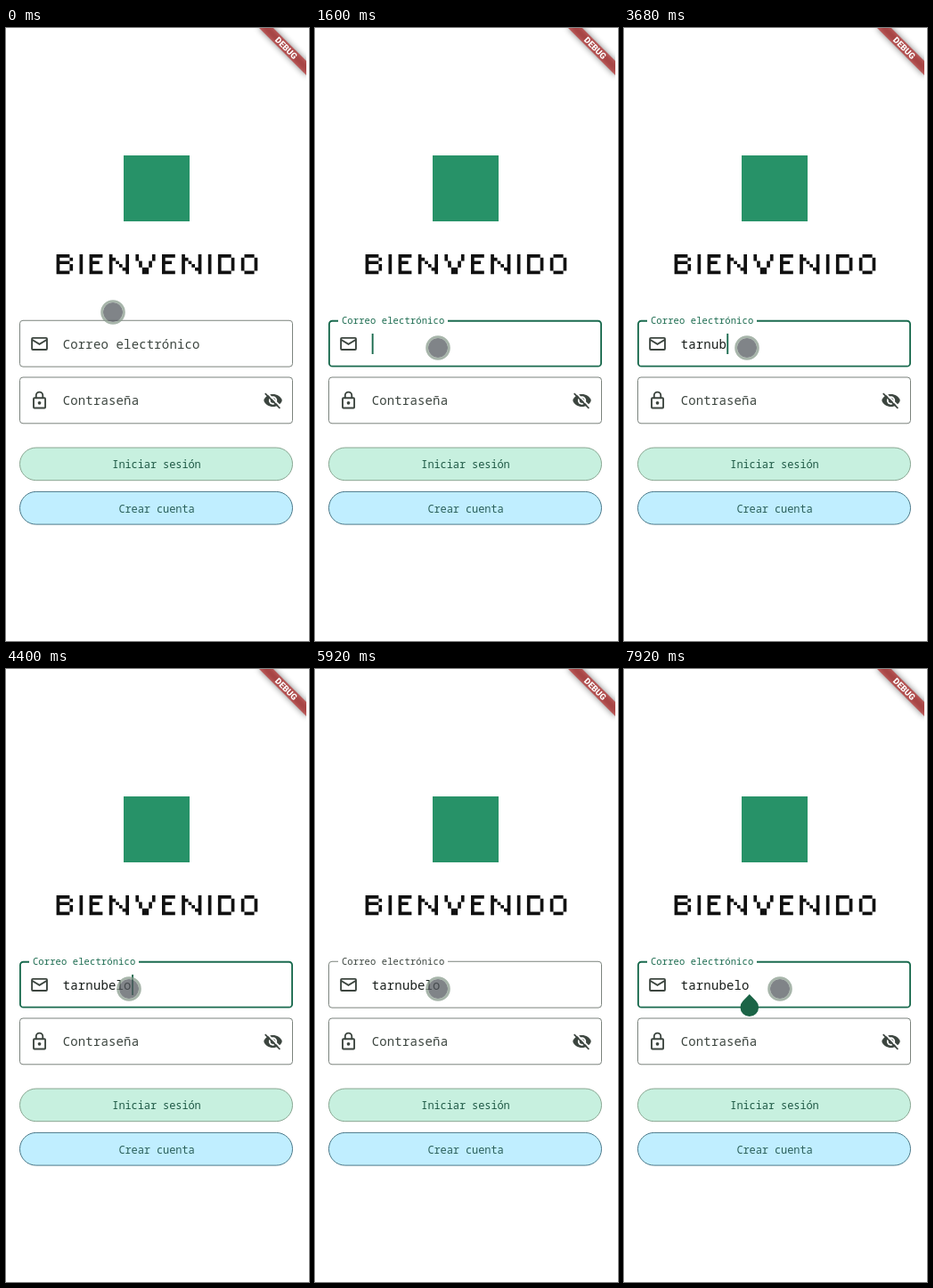
Recreate the animation shown at these times as an HTML page. Size 340x688 px, loop 8 s.

```html
<!DOCTYPE html>
<html lang="es">
<head>
<meta charset="utf-8">
<title>Bienvenido</title>
<style>
  html, body { margin: 0; width: 100%; height: 100%; overflow: hidden; background: #fff; }
  svg { display: block; width: 340px; height: 688px; }
  text { font-family: "Noto Sans Mono", monospace; fill: #3c453f; white-space: pre; }
  .body { font-size: 14px; letter-spacing: .15px; }
  .button { font-size: 12px; letter-spacing: -.1px; text-anchor: middle; }
  .banner { font: 900 9.55px Roboto, sans-serif; fill: #fff; text-anchor: middle; }
  .icon { fill: none; stroke: #3c453f; stroke-width: 2; }
  .box { fill: none; stroke: #737b75; stroke-width: .94; }
</style>
</head>
<body>
<svg viewBox="0 0 340 688">
  <defs>
    <clipPath id="screen"><rect width="337" height="688"/></clipPath>
    <filter id="soft" x="-30%" y="-150%" width="160%" height="400%"><feGaussianBlur stdDeviation="3.6"/></filter>
  </defs>

  <g clip-path="url(#screen)">
    <g transform="translate(314.5 22.5) rotate(45)">
      <rect x="-37.5" y="-5.6" width="75" height="11.2" opacity=".5" filter="url(#soft)"/>
      <rect x="-37.5" y="-5.6" width="75" height="11.2" fill="#b71c1c" opacity=".63"/>
      <text class="banner" y="3.4">DEBUG</text>
    </g>
  </g>

  <rect x="132" y="143" width="74" height="74" fill="#279268"/>
  <g id="title" role="img" aria-label="BIENVENIDO" fill="none" stroke="#111" stroke-linecap="square"></g>

  <rect class="box" id="emailBox"/>
  <rect id="notch" y="326" height="5" fill="#fff"/>
  <g class="icon" transform="translate(26.3 343.2) scale(.936)">
    <rect x="3" y="5" width="18" height="14" rx="1"/><path d="M3 7l9 5.5L21 7"/>
  </g>
  <text class="body" id="label">Correo electrónico</text>
  <text class="body" id="email" x="63.7" y="359.5" style="fill:#171d1a"></text>
  <rect id="caret" y="343" width="1.9" height="23" fill="#1b6b4f"/>

  <rect class="box" x="15.5" y="392" width="306" height="51.8" rx="3.5"/>
  <g class="icon" transform="translate(26.3 406.8) scale(.936)">
    <rect x="5" y="9" width="14" height="12" rx="1"/><path d="M8 9V6a4 4 0 0 1 8 0v3"/>
    <circle cx="12" cy="15" r="2" fill="#3c453f" stroke="none"/>
  </g>
  <text class="body" x="63.7" y="423.3">Contraseña</text>
  <g transform="translate(288.3 406.8) scale(.936)" fill="#3c453f">
    <path d="M1 12C4 2 20 2 23 12 20 22 4 22 1 12z"/>
    <circle cx="12" cy="12" r="5" fill="#fff"/><circle cx="12" cy="12" r="3"/>
    <path d="M4 2L22 20" stroke="#fff" stroke-width="2"/>
    <path d="M2.6 3.6L20.4 21.4" stroke="#3c453f" stroke-width="1.8"/>
  </g>

  <rect x="15.5" y="471" width="306" height="36.7" rx="18.3" fill="#c7f0df" stroke="#83a08b" stroke-width=".94"/>
  <text class="button" x="169" y="494.3" style="fill:#1f5a46">Iniciar sesión</text>
  <rect x="15.5" y="520.4" width="306" height="36.7" rx="18.3" fill="#c0eeff" stroke="#416f80" stroke-width=".94"/>
  <text class="button" x="169" y="544" style="fill:#2a605c">Crear cuenta</text>

  <path id="handle" d="M140.8 365.1l7.28 7.28a10.3 10.3 0 1 1-14.56 0z" fill="#1b6446"/>
  <g id="pointer">
    <circle r="11" fill="#555b60" fill-opacity=".75"/>
    <circle r="12.4" fill="none" stroke="#8a9c8e" stroke-opacity=".75" stroke-width="2.8"/>
  </g>
</svg>
<script>
const $ = id => document.getElementById(id);
const setAll = (id, attrs) => {
  for (const name in attrs) $(id).setAttribute(name, attrs[name]);
};
const LOOP = 8000, USER = 'tarnubelo';
const FOCUS = 1180, BLUR = 5680, REFOCUS = 7400, TYPE_START = 2300, TYPE_STEP = 250;

// Block letters on a six-row grid: width in cells, then strokes.
const glyphs = {
  B: [5, 'M0 0v5M0 0h3M0 2h3M0 5h3M4 1h0M4 3v1'],
  I: [1, 'M0 0v5'],
  E: [4, 'M3 0H0v5h3M0 2h2'],
  N: [6, 'M0 0v5M5 0v5M1 1h0M2 2h0M3 3h0M4 4h0'],
  V: [6, 'M0 0v1M5 0v1M1 2v1M4 2v1M2 4h1v1h-1z'],
  D: [5, 'M3 0H0v5h3M4 1v3'],
  O: [5, 'M1 0h2M1 5h2M0 1v3M4 1v3']
};
const CELL = 3.7;
let penX = 56.6;
for (const ch of 'BIENVENIDO') {
  const [width, strokes] = glyphs[ch];
  $('title').innerHTML +=
    `<path transform="translate(${penX} 254) scale(${CELL}) translate(.5 .5)" d="${strokes}"/>`;
  penX += (width + 2) * CELL;
}

const lerp = (a, b, p) => a + (b - a) * p;
const ease = (t, start, length) => {
  const p = Math.min(1, Math.max(0, (t - start) / length));
  return p * p * (3 - 2 * p);
};
const mix = (a, b, p) => `rgb(${a.map((v, i) => Math.round(lerp(v, b[i], p)))})`;
const GREEN = [27, 107, 79];

function draw(t) {
  const lift = ease(t, FOCUS, 167);
  const glow = lift - ease(t, BLUR, 167) + ease(t, REFOCUS, 167);
  const count = Math.max(0, Math.min(USER.length, Math.floor((t - TYPE_START) / TYPE_STEP) + 1));
  const focused = (t >= FOCUS && t < BLUR) || t >= REFOCUS;

  // The outline thickens inwards; its outer edge stays put.
  const line = lerp(.94, 1.87, glow);
  setAll('emailBox', {
    x: 15 + line / 2, y: 327.8 + line / 2, width: 307 - line, height: 52.8 - line, rx: 3.5
  });
  $('emailBox').style.strokeWidth = line;
  $('emailBox').style.stroke = mix([115, 123, 117], GREEN, glow);
  setAll('notch', { x: 87.5 - 61.5 * lift, width: 123 * lift });
  $('label').style.fill = mix([60, 69, 63], GREEN, glow);
  setAll('label', {
    transform: `translate(${lerp(63.7, 29.9, lift)} ${lerp(359.5, 332.2, lift)}) scale(${lerp(1, .75, lift)})`
  });
  $('email').textContent = USER.slice(0, count);

  // Every keystroke or new focus restarts the blink.
  const restart = t >= REFOCUS ? REFOCUS
    : count ? TYPE_START + (count - 1) * TYPE_STEP : FOCUS;
  const caretOn = focused && (t - restart) % 1000 < 500;
  setAll('caret', { x: 63.7 + 8.6 * count });
  $('caret').style.display = caretOn ? '' : 'none';
  $('handle').style.display = t >= REFOCUS + 40 ? '' : 'none';

  const arrive = ease(t, 60, 340), slide = ease(t, 7180, 200);
  setAll('pointer', {
    transform: `translate(${120 + 18 * arrive + 37 * slide} ${319 + 40 * arrive})`
  });
}

const origin = performance.now();
function tick() {
  draw((performance.now() - origin) % LOOP);
  requestAnimationFrame(tick);
}
tick();
</script>
</body>
</html>
```
